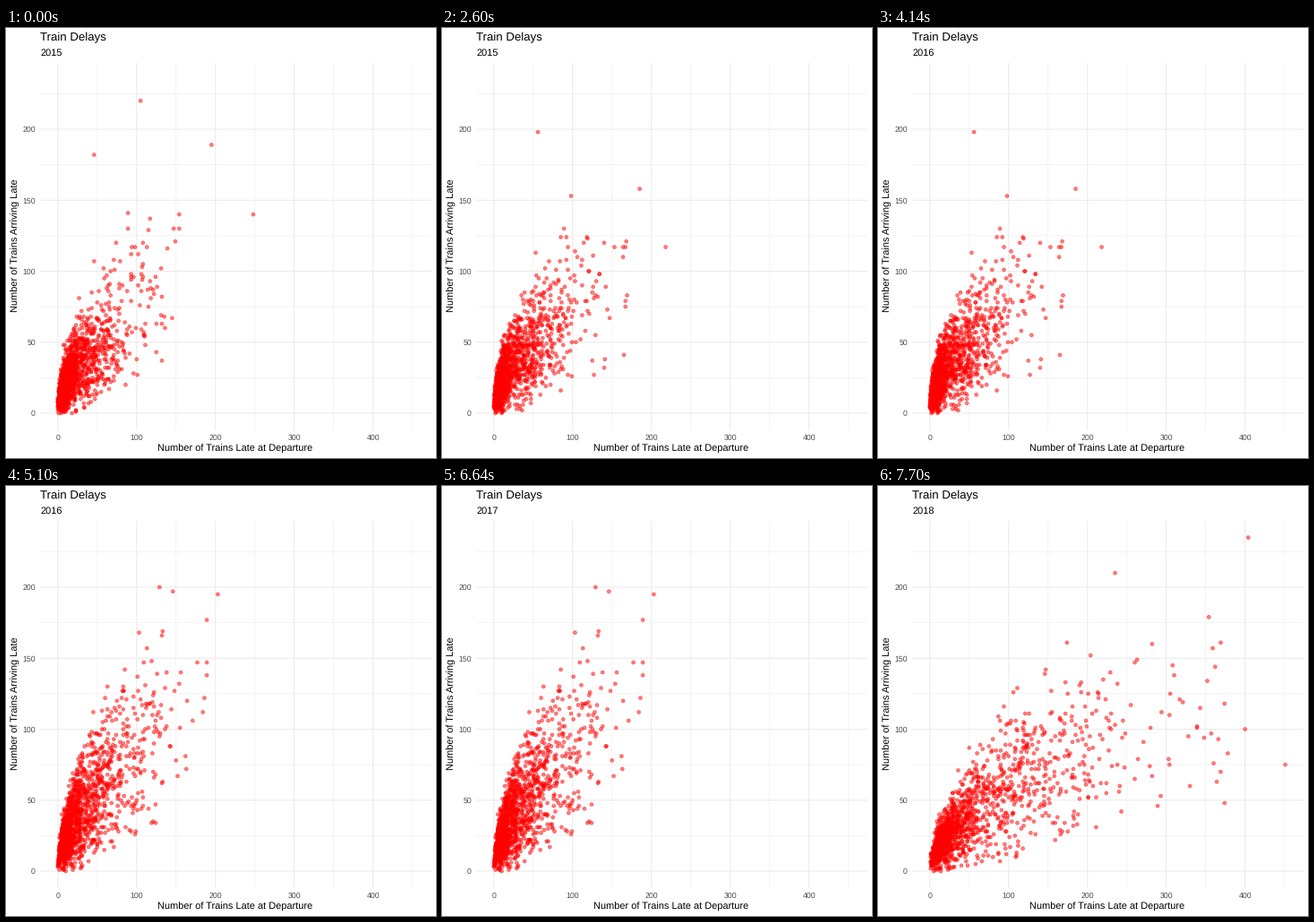
Write a matplotlib script that moves like this. It is 480 px wide and 480 px high and loops after 10 s.

```python
import numpy as np
import matplotlib.pyplot as plt
from matplotlib.animation import FuncAnimation

plt.rcParams["font.family"] = "Liberation Sans"
plt.rcParams["text.hinting"] = "none"

SIZE, DPI = 480, 72
LEFT, RIGHT, TOP, BOTTOM = 38.0, 474.5, 38.9, 448.6
X_MAX, Y_MAX = 451, 235
GRID, TICK_TEXT, RED = "#EBEBEB", "#4D4D4D", (1, 0, 0, 0.5)


def make_cloud(seed, core, fan, tail_y, top_slope, low_slope, extremes):
    """Dense core, wider fan and thin tail, each around a typical (x, y)."""
    rng = np.random.default_rng(seed)
    tail = (2.2 * fan[0], tail_y)
    groups = [(1060, core, 0.82, 0.55, 0.42),
              (370, fan, 0.48, 0.45, 0.45),
              (45, tail, 0.28, 0.10, 0.30)]
    parts = [np.array(extremes)]
    for count, (x_mid, y_mid), x_spread, power, y_spread in groups:
        x = np.round(x_mid * rng.lognormal(0, x_spread, 4 * count) - 0.8)
        x = np.maximum(x, 0)
        trend = y_mid * ((x + 1) / (x_mid + 1)) ** power
        y = trend * rng.normal(1, y_spread, x.size) + rng.normal(0, 1.5, x.size)
        y = np.round(y)
        inside = ((y >= 0) & (y > low_slope * x - 9) & (y < 38 + top_slope * x)
                  & (x < 3.4 * fan[0]) & (y < 1.45 * tail_y))
        parts.append(np.column_stack([x, y])[inside][:count])
    return np.vstack(parts)


CLOUDS = {
    2015: make_cloud(1, (11, 23), (47, 41), 100, 2.2, 0.33,
                     [(105, 220), (195, 189), (46, 182), (248, 140)]),
    2016: make_cloud(2, (11, 24), (50, 43), 95, 1.5, 0.28,
                     [(56, 198), (185, 158), (98, 153), (218, 117)]),
    2017: make_cloud(3, (15, 30), (58, 59), 118, 1.7, 0.33,
                     [(203, 195), (129, 200), (146, 197), (189, 177)]),
    2018: make_cloud(4, (25, 26), (125, 64), 112, 1.3, 0.15,
                     [(404, 235), (235, 210), (354, 179), (451, 75)]),
}
YEARS = list(CLOUDS)


def label(x, y, text, size, **style):
    return fig.text(x / SIZE, 1 - y / SIZE, text, fontsize=size, **style)


def px(x):
    return LEFT + (x / X_MAX + 0.05) / 1.1 * (RIGHT - LEFT)


def py(y):
    return BOTTOM - (y / Y_MAX + 0.05) / 1.1 * (BOTTOM - TOP)


fig = plt.figure(figsize=(SIZE / DPI, SIZE / DPI), dpi=DPI, facecolor="white")
ax = fig.add_axes([LEFT / SIZE, 1 - BOTTOM / SIZE,
                   (RIGHT - LEFT) / SIZE, (BOTTOM - TOP) / SIZE])
ax.axis("off")
ax.set_xlim(-0.05 * X_MAX, 1.05 * X_MAX)
ax.set_ylim(-0.05 * Y_MAX, 1.05 * Y_MAX)

for x in range(0, 451, 50):
    ax.axvline(x, color=GRID, lw=0.53 if x % 100 else 1.07, snap=False, zorder=1)
for y in range(0, 226, 25):
    ax.axhline(y, color=GRID, lw=0.53 if y % 50 else 1.07, snap=False, zorder=1)

for x in range(0, 401, 100):
    label(px(x), 460, str(x), 8.8, color=TICK_TEXT, ha="center")
for y in range(0, 201, 50):
    label(33, py(y) + 3.2, str(y), 8.8, color=TICK_TEXT, ha="right")

label(38, 14.4, "Train Delays", 13.2)
subtitle = label(38, 31.2, "2015", 11)
label(255.5, 473, "Number of Trains Late at Departure", 11, ha="center")
label(15.8, 243, "Number of Trains Arriving Late", 11,
      ha="right", va="center", rotation=90)

# One size per point keeps the dots at sub-pixel positions.
clouds = [ax.scatter(*points.T, s=np.full(len(points), 15.2), lw=0.75,
                     facecolors=[RED], edgecolors=[RED], zorder=2)
          for points in CLOUDS.values()]


def update(frame):
    shown = max(frame - 1, 0) // 25
    for i, cloud in enumerate(clouds):
        cloud.set_visible(i == shown)
    # The year in the subtitle trails the data by one step.
    subtitle.set_text(str(YEARS[max(frame - 2, 0) // 25]))
    return [*clouds, subtitle]


animation = FuncAnimation(fig, update, frames=100, interval=100,
                          repeat=True, repeat_delay=0, blit=False)
plt.show()
```
